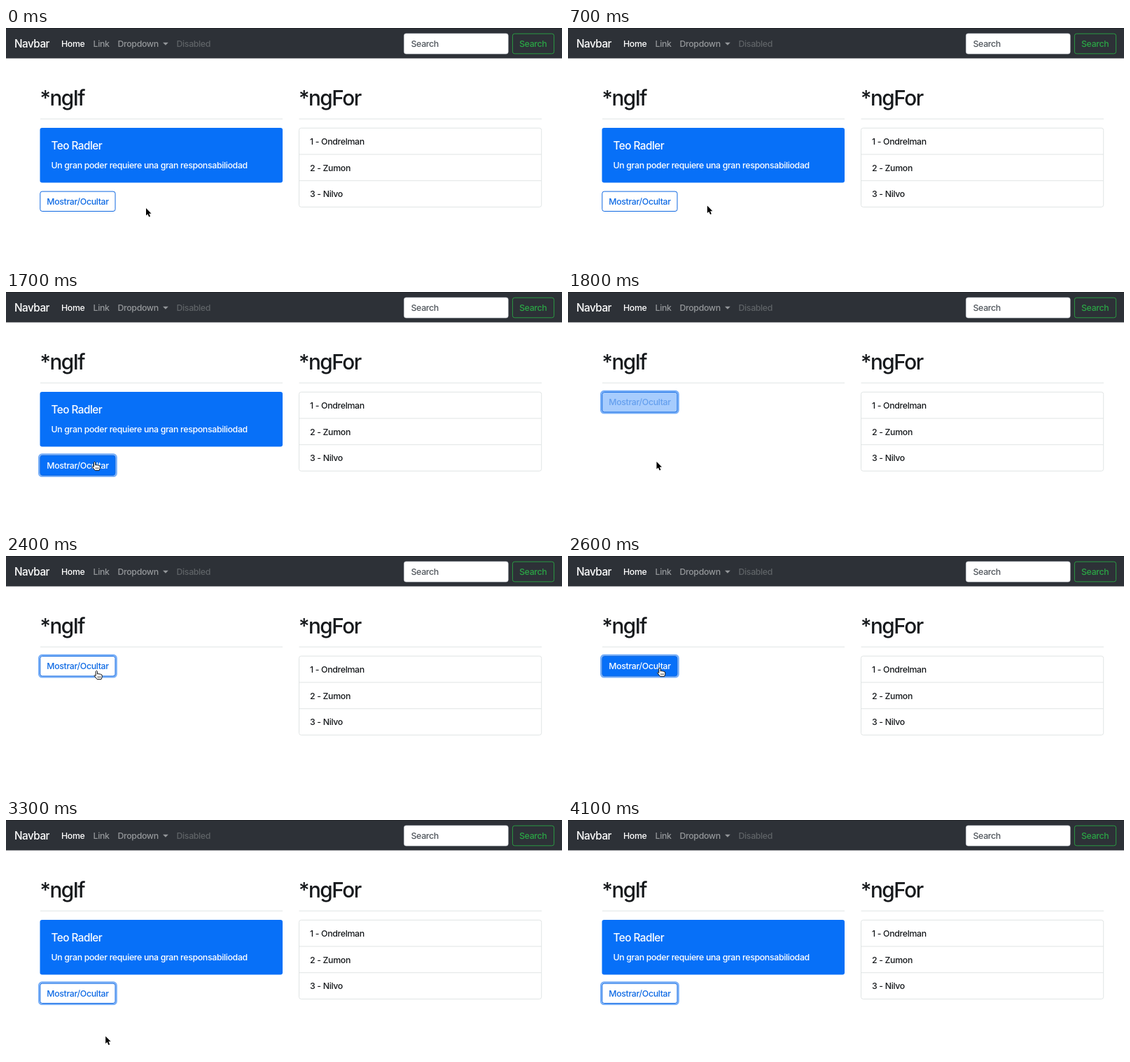
An HTML page for the animation above (5400 ms loop, 794 px wide and 338 px high).

```html
<!DOCTYPE html>
<html lang="es">
<head>
<meta charset="utf-8">
<title>Directivas</title>
<style>
  html, body { margin: 0; width: 100%; height: 100%; overflow: hidden; background: #fff; }
  svg { display: block; width: 794px; height: 338px; }
  text { font: 450 12.3px Inter, "Open Sans", sans-serif; font-optical-sizing: none; letter-spacing: -.026em; fill: #16191c; }
  .heading { font-size: 29.7px; letter-spacing: -.05em; }
  .title { font-size: 15.3px; letter-spacing: -.034em; }
  .white { fill: #fff; }
  .muted { fill: #94979a; }
  .disabled { fill: #5f6367; }
  .green { fill: #2ba545; }
  .line { fill: none; stroke: #d9dddd; stroke-width: .8; }
</style>
</head>
<body>
<svg viewBox="0 0 794 338">
  <defs>
    <path id="caret" d="M-3-6.3Q0-6.3 0-4.4 0-6.3 3-6.3M0-4.4V4.4M-3 6.3Q0 6.3 0 4.4 0 6.3 3 6.3M-1.6 1.8H1.6"/>
  </defs>

  <rect width="794" height="43.5" fill="#2d3137"/>
  <rect width="794" height="1" fill="#202327"/>
  <text class="title white" x="12" y="28">Navbar</text>
  <text class="white" x="79" y="27">Home</text>
  <text class="muted" x="124.5" y="27">Link</text>
  <text class="muted" x="159.5" y="27">Dropdown</text>
  <path class="muted" d="M224 20.8h7.8l-3.9 4z"/>
  <text class="disabled" x="243.5" y="27">Disabled</text>
  <rect x="568.4" y="7.9" width="148.8" height="29.2" rx="3" fill="#fff" stroke="#ced4da" stroke-width=".6"/>
  <text x="578.5" y="27" style="fill:#50565c">Search</text>
  <rect x="723.4" y="8.2" width="59.2" height="28.6" rx="3" fill="none" stroke="#2ba545" stroke-width=".9"/>
  <text class="green" x="733" y="27">Search</text>

  <text class="heading" x="48.5" y="111">*ngIf</text>
  <text class="heading" x="418" y="111">*ngFor</text>
  <path class="line" d="M49 130.2H395M418.5 130.2H765"/>

  <g id="card">
    <rect x="48.5" y="143" width="346.5" height="78.5" rx="3" fill="#0770f8"/>
    <text class="title white" x="64.5" y="174">Teo Radler</text>
    <text class="white" x="64.5" y="200.5">Un gran poder requiere una gran responsabiliodad</text>
  </g>

  <rect class="line" x="418.5" y="143.3" width="346.2" height="113.1" rx="3"/>
  <path class="line" d="M418.5 181h346M418.5 218.7h346"/>
  <text x="434" y="167">1 - Ondrelman</text>
  <text x="434" y="204.6">2 - Zumon</text>
  <text x="434" y="242.2">3 - Nilvo</text>

  <g id="button">
    <rect id="ring" x="47.2" y="-1.2" width="110.4" height="31.4" rx="4.2" fill="none" stroke="#78aff8" stroke-width="2.4"/>
    <rect id="face" x="48.8" y=".4" width="107.2" height="28.4" rx="3" stroke="#0f68e2"/>
    <text id="label" x="58.3" y="19">Mostrar/Ocultar</text>
  </g>

  <g id="arrow" class="cursor">
    <path d="M0 0V10.6L2.4 8.4 4.2 12.6 6 11.8 4.2 7.7H7.5Z" stroke="#fff" stroke-width="1.4" paint-order="stroke"/>
  </g>
  <g id="hand" class="cursor" stroke="#111" fill="#fff" stroke-linejoin="round">
    <path d="M-1.2 7.4V1.2Q0-.8 1.2 1.2V5Q2.6 3.9 3.6 5.1 4.9 4.3 5.8 5.6 7.6 5.2 7.8 7V9.4L6.6 12.6H.8L-3.3 7.6Q-3.2 5.7-1.2 7.4Z"/>
    <path d="M1.8 8.2V10.6M3.6 8.2V10.6M5.4 8.2V10.6" stroke-width=".7"/>
  </g>
  <g id="beam" class="cursor" fill="none">
    <use href="#caret" stroke="#fff" stroke-width="2.6"/>
    <use href="#caret" stroke="#222" stroke-width="1.1"/>
  </g>
</svg>
<script>
  const LOOP = 5400, STEP = 100, FADE = 155;
  const BLUE = [7, 112, 248], INK = [14, 106, 228], WHITE = [255, 255, 255];
  const HIDE = 1800, SHOW = 2800; // the two clicks
  const START = { x: 200, y: 258 };
  const MOVES = [
    { from: 600, to: 1400, x: 128.5, y: 240 },
    { from: 1500, to: 1700, x: 126.5, y: 243 },
    { from: 2000, to: 2500, x: 131, y: 160 },
    { from: 3000, to: 3500, x: 162, y: 345 }
  ];

  const $ = id => document.getElementById(id);
  const ramp = (t, from, length) => Math.min(1, Math.max(0, (t - from) / length));
  const lerp = (a, b, k) => a + (b - a) * k;
  const mix = (a, b, k) => `rgb(${a.map((v, i) => Math.round(lerp(v, b[i], k)))})`;
  const inside = ({ x, y }, left, top, width, height) =>
    x >= left && x <= left + width && y >= top && y <= top + height;

  // Sideways speeds up while vertical slows down, which bends each move.
  const pointerAt = t => MOVES.reduce((p, { from, to, x, y }) => {
    const k = ramp(t, from, to - from);
    return { x: lerp(p.x, x, k * k), y: lerp(p.y, y, Math.sin(k * Math.PI / 2)) };
  }, START);

  // The hover colour fades in before each click and out with it.
  const hoverAt = t => [HIDE, SHOW].reduce((sum, click) =>
    sum + ramp(t, click - 400, FADE) - ramp(t, click - 100, FADE), 0);

  function draw(now) {
    const t = Math.floor(now % LOOP / STEP) * STEP;
    const open = t < HIDE || t >= SHOW;
    const buttonTop = open ? 233.7 : 143.2;
    const pointer = pointerAt(t), hover = hoverAt(t);
    const shape = inside(pointer, 48, buttonTop, 109, 29) ? 'hand'
      : open && inside(pointer, 64, 155, 73, 25) ? 'beam' : 'arrow';

    $('card').style.display = open ? '' : 'none';
    $('button').setAttribute('transform', `translate(0 ${buttonTop})`);
    $('ring').style.display = t >= HIDE - STEP ? '' : 'none';
    $('face').style.fill = mix(WHITE, BLUE, hover);
    $('label').style.fill = mix(INK, WHITE, hover);

    for (const cursor of document.querySelectorAll('.cursor')) {
      cursor.style.display = cursor.id === shape ? '' : 'none';
      cursor.setAttribute('transform', `translate(${pointer.x} ${pointer.y})`);
    }
    requestAnimationFrame(draw);
  }
  requestAnimationFrame(draw);
</script>
</body>
</html>
```
